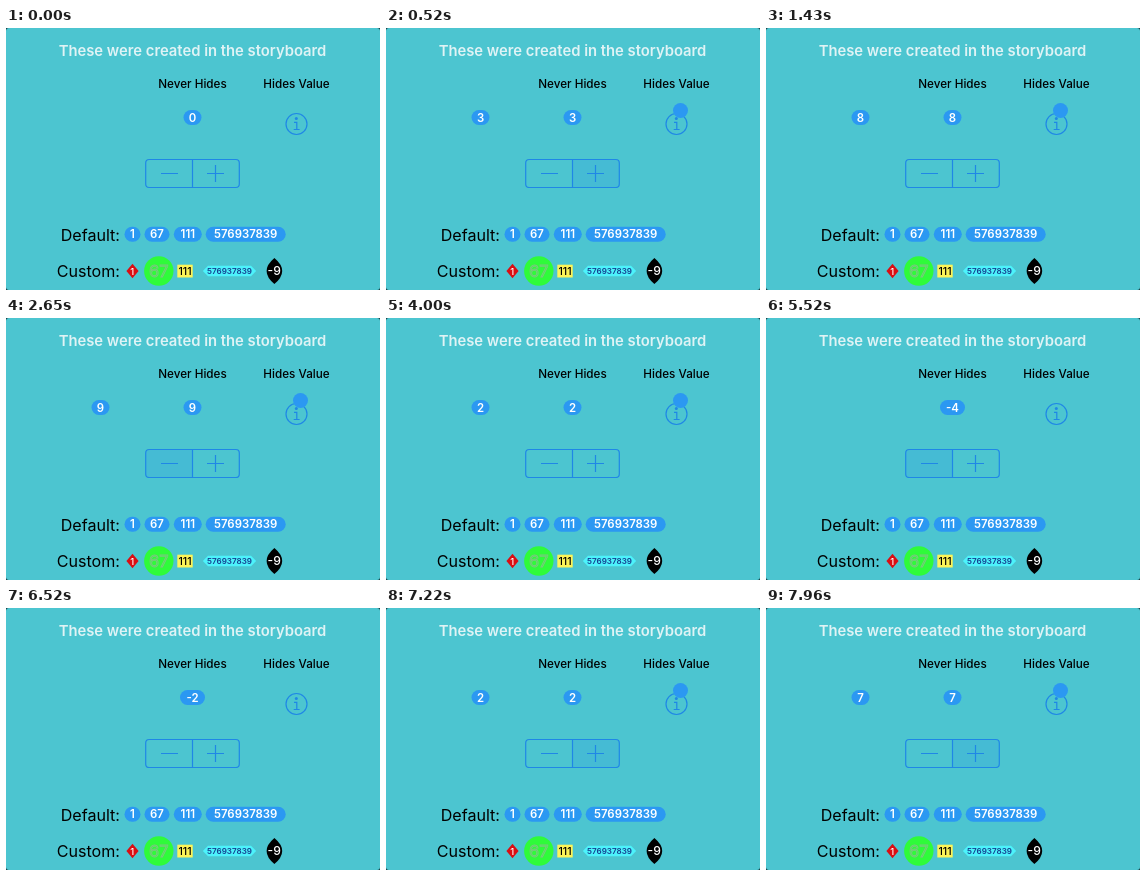
An HTML page for the animation above (8000 ms loop, 374 px wide and 262 px high).

```html
<!DOCTYPE html>
<html lang="en">
<head>
<meta charset="utf-8">
<title>Badges</title>
<style>
  html, body { margin: 0; width: 100%; height: 100%; overflow: hidden; background: #16343a; }
  svg { display: block; width: 374px; height: 262px; font-family: Inter, Roboto, sans-serif; }
  text { text-anchor: middle; }
  .blue { fill: #2b98f2; }
  .line { fill: none; stroke: #1f87e6; stroke-width: 1.2; }
  .num { fill: #fff; font-size: 11.4px; font-weight: 600; }
  .head { font-size: 11.7px; font-weight: 500; }
  .row { font-size: 16.1px; text-anchor: end; }
  .press { fill: #1f87e6; opacity: 0; }
</style>
</head>
<body>
<svg id="stage" viewBox="0 0 374 262"></svg>
<script>
const stage = document.getElementById('stage');
const LOOP = 8000;

// Evenly spaced runs of taps on the stepper, times in ms.
const BURSTS = [
  { start: 180, gap: 165, taps: 10, dir: 1 },
  { start: 2440, gap: 215, taps: 9, dir: -1 },
  { start: 4425, gap: 230, taps: 6, dir: -1 },
  { start: 6126, gap: 164, taps: 12, dir: 1 }
];
const PRESS_BEFORE = 60, PRESS_AFTER = 50;

const label = (str, x, y, attrs) => `<text x="${x}" y="${y}" ${attrs}>${str}</text>`;
const badge = (str, x, y, w, id = '') => `<g id="${id}">
  <rect x="${x - w / 2}" y="${y - 7.5}" width="${w}" height="15" rx="7.5" class="blue"/>
  ${label(str, x, y + 4.1, 'class="num"')}</g>`;

stage.innerHTML = `
  <rect width="374" height="262" rx="3" fill="#4cc5d0"/>
  ${label('These were created in the storyboard', 186.5, 28, 'font-size="14.8" font-weight="600" fill="#dff3f5"')}
  ${label('Never Hides', 186.5, 59.5, 'class="head"')}
  ${label('Hides Value', 290.5, 59.5, 'class="head"')}

  ${badge('', 94.5, 89.5, 18, 'hiding')}
  ${badge('0', 186.5, 89.5, 18, 'steady')}
  <circle cx="290.5" cy="96" r="10.5" class="line"/>
  <circle cx="290.3" cy="90.4" r="1.5" fill="#1f87e6"/>
  <path d="M288 94.3H290.8V101.5M287.7 101.5H293.6" class="line"/>
  <circle id="dot" cx="294.5" cy="82.5" r="7.5" class="blue"/>

  <path id="minus" class="press" d="M186.5 131.5H143.5Q140 131.5 140 135V156Q140 159.5 143.5 159.5H186.5Z"/>
  <path id="plus" class="press" d="M186.5 131.5H229.5Q233 131.5 233 135V156Q233 159.5 229.5 159.5H186.5Z"/>
  <rect x="139.7" y="131.5" width="93.6" height="28" rx="3.5" class="line"/>
  <path d="M186.5 131.5V159.5M155 145.5H172M201 145.5H218M209.5 137V154" class="line"/>

  ${label('Default:', 114, 213, 'class="row"')}
  ${badge('1', 126.5, 206.3, 16)}
  ${badge('67', 151, 206.3, 25)}
  ${badge('111', 181.8, 206.3, 28)}
  ${badge('576937839', 239.7, 206.3, 80)}

  ${label('Custom:', 114, 249, 'class="row"')}
  <path d="M126.5 235.7L132.6 243L126.5 250.3L120.4 243Z" fill="#d90e14"/>
  ${label('1', 126.3, 246.6, 'font-size="9.5" font-weight="500" fill="#fff"')}
  <circle cx="152.8" cy="243" r="14.7" fill="#2ffb3a"/>
  ${label('67', 152.8, 249, 'font-size="16.5" fill="#45f250" stroke="#7fc383" stroke-width=".8"')}
  <rect x="171.3" y="236.7" width="15.4" height="12.8" fill="#fdf457"/>
  ${label('111', 179, 247, 'font-size="10.5" font-weight="500"')}
  <path d="M196.8 243L202 237.8H245L250.2 243L245 248.2H202Z" fill="#4df2fb"/>
  ${label('576937839', 223.5, 246, 'font-size="8.1" font-weight="600" fill="#143f90"')}
  <path d="M268.4 230Q284 243 268.4 256Q252.8 243 268.4 230Z"/>
  ${label('-9', 268.2, 247.3, 'font-size="12.2" font-weight="500" fill="#fff"')}
`;

const $ = id => document.getElementById(id);
const hiding = $('hiding'), steady = $('steady'), dot = $('dot');
const buttons = { minus: $('minus'), plus: $('plus') };

function setBadge(group, value) {
  const [rect, text] = group.children;
  const width = String(value).length > 1 ? 25 : 18;
  rect.setAttribute('x', text.getAttribute('x') - width / 2);
  rect.setAttribute('width', width);
  text.textContent = value;
}

function stateAt(t) {
  let value = 0, pressed = '';
  for (const { start, gap, taps, dir } of BURSTS) {
    for (let i = 0; i < taps; i++) {
      const since = t - start - i * gap;
      if (since >= 0) value += dir;
      if (since >= -PRESS_BEFORE && since < PRESS_AFTER) pressed = dir > 0 ? 'plus' : 'minus';
    }
  }
  return { value, pressed };
}

function draw(t) {
  const { value, pressed } = stateAt(t);
  setBadge(steady, value);
  setBadge(hiding, value);
  hiding.style.visibility = dot.style.visibility = value > 0 ? 'visible' : 'hidden';
  for (const name in buttons) buttons[name].style.opacity = name === pressed ? 0.16 : 0;
}

const start = performance.now();
function tick() {
  draw((performance.now() - start) % LOOP);
  requestAnimationFrame(tick);
}
draw(0);
requestAnimationFrame(tick);
</script>
</body>
</html>
```
